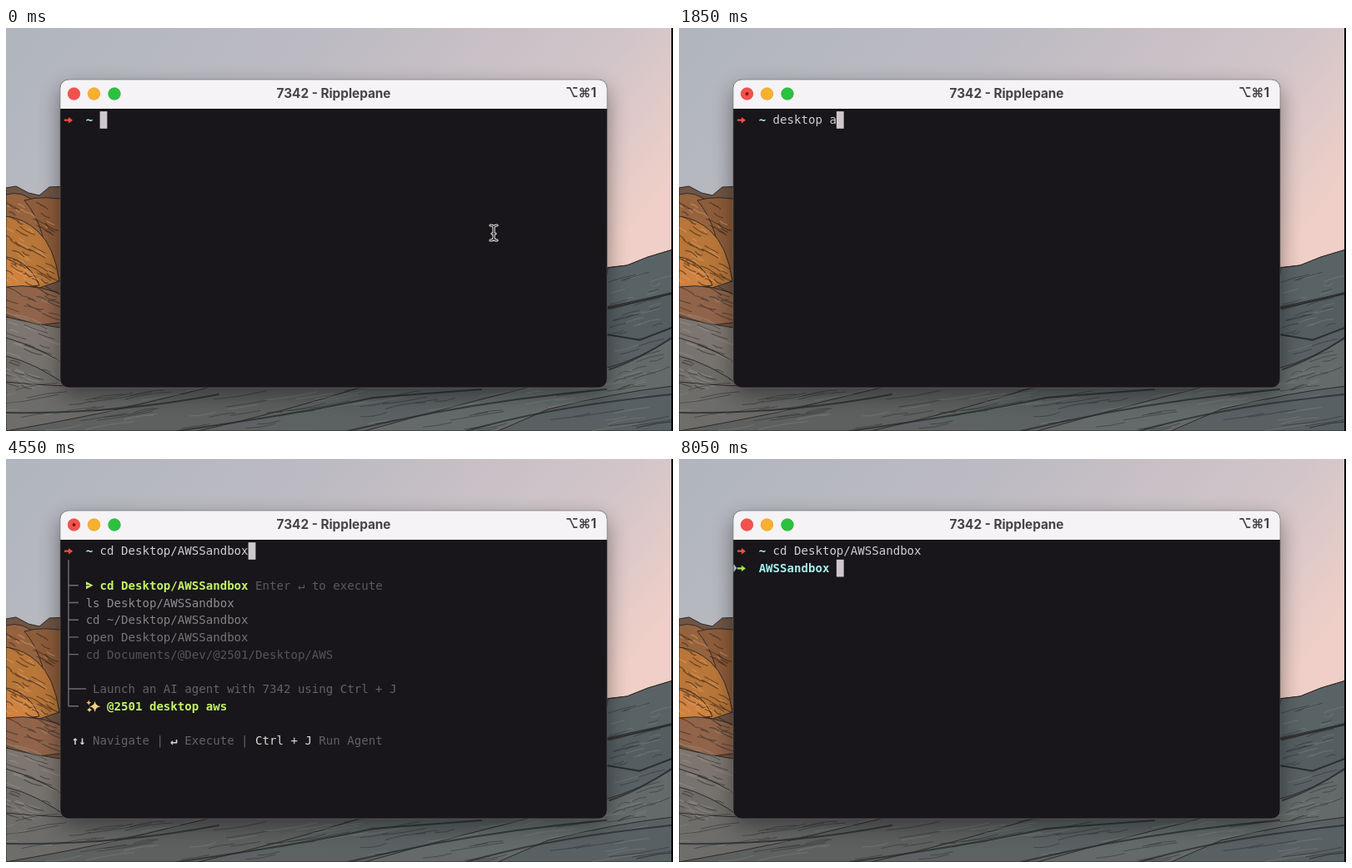
Write an HTML page that moves like this. It is 800x484 px and loops after 8.65 s.

```html
<!DOCTYPE html>
<html lang="en">
<head>
<meta charset="utf-8">
<title>Shell suggestions</title>
<style>
  html, body { margin: 0; width: 100%; height: 100%; overflow: hidden; background: #000; }
  svg { display: block; width: 100vw; height: 100vh; }
  text { white-space: pre; }
  .mono { font: 14.08px "DejaVu Sans Mono", monospace; }
  .ui { font: 700 15.3px Inter, "DejaVu Sans", sans-serif; fill: #464346; }
</style>
</head>
<body>
<svg viewBox="0 0 800 484" xmlns="http://www.w3.org/2000/svg">
  <defs>
    <linearGradient id="sky" gradientUnits="userSpaceOnUse" x1="0" y1="0" x2="560" y2="470">
      <stop offset="0" stop-color="#b0b5be"/>
      <stop offset=".42" stop-color="#bdbbc2"/>
      <stop offset=".8" stop-color="#d2c5c9"/>
      <stop offset="1.0" stop-color="#efcfc7"/>
    </linearGradient>
    <linearGradient id="stone" x1="0" y1="0" x2="1" y2="0">
      <stop offset="0" stop-color="#706e6b"/>
      <stop offset=".3" stop-color="#5e6262"/>
      <stop offset="1" stop-color="#576063"/>
    </linearGradient>
    <filter id="soft" x="-20%" y="-20%" width="140%" height="150%"><feGaussianBlur stdDeviation="13"/></filter>
    <clipPath id="frame"><rect x="65" y="62" width="656" height="370" rx="10"/></clipPath>
  </defs>

  <rect width="800" height="484" fill="url(#sky)"/>
  <g id="rocks" stroke="#2e2a27" stroke-linejoin="round"></g>
  <g id="cracks" fill="none" stroke-linecap="round"></g>
  <rect x="65" y="72" width="656" height="368" rx="12" fill="#000" opacity=".42" filter="url(#soft)"/>
  <rect x="798" width="2" height="484" fill="#000"/>

  <g clip-path="url(#frame)">
    <rect x="65" y="62" width="656" height="370" fill="#18161a"/>
    <rect x="65" y="62" width="656" height="35" fill="#f5f3f5"/>
    <rect x="65" y="97" width="656" height="1" fill="#0a0a0a"/>
  </g>
  <rect x="65" y="62" width="656" height="370" rx="10" fill="none" stroke="#6a686a" stroke-width=".6"/>
  <circle cx="81.5" cy="79" r="7.3" fill="#f4514d" stroke="#dc403d" stroke-width=".6"/>
  <circle cx="105.5" cy="79" r="7.3" fill="#f8b02f" stroke="#dc9a24" stroke-width=".6"/>
  <circle cx="130" cy="79" r="7.3" fill="#2bc240" stroke="#20a632" stroke-width=".6"/>
  <circle id="busy" cx="81.5" cy="79" r="2" fill="#7d1714"/>
  <text class="ui" x="393" y="84" text-anchor="middle">7342 - Ripplepane</text>
  <text class="ui" x="708" y="82.5" text-anchor="end">⌥⌘1</text>
  <g id="screen" class="mono"></g>
  <g id="pointer" fill="none" stroke-linecap="round">
    <path d="M581 237q4 0 4 3q0-3 4-3M585 240v12M583 247h4M581 255q4 0 4-3q0 3 4 3" stroke="#e8e8e8" stroke-width="3.2"/>
    <path d="M581 237q4 0 4 3q0-3 4-3M585 240v12M583 247h4M581 255q4 0 4-3q0 3 4 3" stroke="#161616" stroke-width="1.2"/>
  </g>
</svg>
<script>
const LOOP = 8650, CELL = 8.477, ROW = 20.7, LEFT = 70.2, TOP = 110.4;
const LIME = '#c4f466', CYAN = '#a2f1ed', PLAIN = '#cfcecf', FAINT = '#626263';
const $ = id => document.getElementById(id);
const colX = c => LEFT + c * CELL;
const rowY = r => TOP + r * ROW;

// Landscape
const rock = (fill, d) => `<path d="${d}" fill="${fill}"/>`;
$('rocks').innerHTML =
  rock('#6f5545', 'M0 192L12 190 27 198 40 201 52 191 80 190V484H0Z') +
  rock('#96633f', 'M0 200Q20 194 38 212 52 226 56 250L0 246Z') +
  rock('#8d5c3a', 'M22 207Q45 200 80 208V300H50Q50 240 22 207Z') +
  rock('#b97639', 'M0 226Q22 229 38 244 58 262 64 304L40 312 0 300Z') +
  rock('#cf8240', 'M0 275Q27 279 40 309L0 314Z') +
  rock('#91644a', 'M0 311Q40 305 80 326V352L30 358 0 346Z') +
  rock('#7d7670', 'M0 347Q35 356 80 362V420L0 380Z') +
  rock('#77736f', 'M0 372Q42 384 80 410V484H0Z') +
  rock('#6e6c69', 'M0 394Q36 402 80 434V484H0Z') +
  rock('url(#stone)', 'M0 425Q60 431 100 430H690L718 288 745 285 770 275 800 266V484H0Z') +
  rock('#596366', 'M722 288L745 285 770 275 800 266V318L715 336Z') +
  rock('#545e61', 'M715 337L758 329 800 319V360L760 374 715 368Z') +
  rock('#646a6a', 'M715 410Q760 398 800 372V430Q730 438 650 458L590 484H430Q560 447 715 410Z') +
  rock('#5e605f', 'M0 484Q110 465 180 447L250 430H430Q330 462 230 484Z');

function seeded(seed) {
  return () => (seed = (seed * 16807) % 2147483647) / 2147483647;
}
function crackSet(count, x, y, w, h, slope, len, seed) {
  const rnd = seeded(seed);
  let d = '';
  for (let i = 0; i < count; i++) {
    const l = len * (.4 + rnd());
    const bend = (rnd() - .5) * 8;
    d += `M${x + rnd() * w} ${y + rnd() * h}q${l / 2} ${slope * l / 2 + bend} ${l} ${slope * l}`;
  }
  return d;
}
const cracks = (d, width, opacity, color = '#262a2b') =>
  `<path d="${d}" stroke="${color}" stroke-width="${width}" opacity="${opacity}"/>`;
$('cracks').innerHTML =
  cracks(crackSet(22, -5, 208, 56, 95, .55, 13, 29), 1.3, .5, '#e0a164') +
  cracks(crackSet(46, -5, 205, 58, 108, .55, 14, 41), 1.2, .6, '#352318') +
  cracks(crackSet(24, -12, 318, 66, 112, .35, 22, 53), 1.3, .4, '#a39b93') +
  cracks(crackSet(32, -12, 318, 66, 116, .35, 24, 17), 1.1, .55) +
  cracks(crackSet(34, -30, 434, 790, 50, -.16, 44, 11), 1.3, .3, '#8b9190') +
  cracks(crackSet(52, -30, 434, 790, 50, -.16, 54, 73), 1, .5) +
  cracks(crackSet(20, 716, 294, 65, 150, -.28, 22, 31), 1.3, .3, '#899294') +
  cracks(crackSet(30, 716, 294, 65, 150, -.28, 24, 97), 1, .5) +
  cracks('M0 462Q130 464 255 440M205 484Q365 461 440 444L570 434M410 484Q560 448 720 434M552 484Q650 455 798 440M722 337L798 319M722 368L760 375 798 360M724 410Q760 398 798 372', 2, .75);

// Terminal parts
const put = (row, col, str, fill, bold) =>
  `<text x="${colX(col)}" y="${rowY(row) + 5}" fill="${fill}"${bold ? ' font-weight="700"' : ''}>${str}</text>`;
const block = (row, col, fill = '#cdc8cc') =>
  `<rect x="${colX(col)}" y="${rowY(row) - 10.3}" width="8.8" height="20.7" fill="${fill}"/>`;
const arrow = (row, fill) =>
  `<path transform="translate(70 ${rowY(row) + .3})" d="M0-1.1H5V-3.7L10 0 5 3.7V1.1H0Z" fill="${fill}"/>`;
const star = (x, y, r, fill) =>
  `<path transform="translate(${x} ${y}) scale(${r})" d="M0-1Q.1-.1 1 0 .1.1 0 1-.1.1-1 0-.1-.1 0-1Z" fill="${fill}"/>`;
function sparkles(row, col) {
  const x = colX(col), y = rowY(row);
  return star(x + 11, y + .5, 6.8, '#f6cf7c') + star(x + 3.6, y - 4, 3.4, '#f0b95a') + star(x + 4.4, y + 4.6, 3, '#f5d898');
}
const prompt = cmd => arrow(0, '#f0513f') + put(0, 3, '~', CYAN, true) + put(0, 5, cmd, PLAIN);

const suggestions = ['cd Desktop/AWSSandbox', 'ls Desktop/AWSSandbox', 'cd ~/Desktop/AWSSandbox',
  'open Desktop/AWSSandbox', 'cd Documents/@Dev/@2501/Desktop/AWS'];
const shades = ['#6c6c6c', '#8e8e8e', '#828282', '#747474', '#555556'];

function menu(selected) {
  let d = `M75 ${rowY(1) - 10}V${rowY(9)}H87M75 ${rowY(8)}H96`, out = '';
  suggestions.forEach((s, i) => {
    const row = i + 2;
    d += `M75 ${rowY(row)}H87`;
    if (!selected || i) out += put(row, 3, s, shades[i]);
  });
  if (selected) {
    out += `<path d="M96 ${rowY(2) - 4.5}L104.5 ${rowY(2)} 96 ${rowY(2) + 4.5}Z" fill="${LIME}"/>` +
      `<path d="M95.5 ${rowY(2)}H100" stroke="#18161a"/>` +
      put(2, 5, suggestions[0], LIME, true) + put(2, 27, 'Enter ↵ to execute', '#5a5a5b');
  }
  return `<path d="${d}" fill="none" stroke="#6e6e6f" stroke-width="1.4"/>` + out +
    put(8, 4, 'Launch an AI agent with 7342 using Ctrl + J', FAINT) +
    sparkles(9, 3) + put(9, 6, '@2501 desktop aws', LIME, true) +
    put(11, 1, '↑↓', '#d8d8d8', true) + put(11, 4, 'Navigate |', FAINT) +
    put(11, 15, '↵', '#d8d8d8', true) + put(11, 17, 'Execute |', FAINT) +
    put(11, 27, 'Ctrl + J', '#d8d8d8') + put(11, 36, 'Run Agent', FAINT);
}

// Timeline
const query = 'desktop aws';
const keyTimes = [850, 900, 1000, 1050, 1200, 1350, 1450, 1600, 1800, 1950, 2050];
const FETCH = 2250, LIST = 3200, SELECT = 4300, RUN = 5800, DONE = 5950;

function screenAt(t) {
  if (t >= DONE) {
    return prompt(suggestions[0]) + `<path d="M65.5 ${rowY(1) - 5}L69.5 ${rowY(1)} 65.5 ${rowY(1) + 5}Z" fill="#a6b3c6"/>` +
      arrow(1, '#9be84f') + put(1, 3, 'AWSSandbox', CYAN, true) + block(1, 14);
  }
  if (t >= RUN) return prompt(suggestions[0]) + block(1, 0);
  if (t >= SELECT) return prompt(suggestions[0]) + menu(true) + block(0, 26);
  const typed = keyTimes.filter(k => k <= t).length;
  let out = prompt(query.slice(0, typed));
  if (t >= LIST) out += menu(false);
  else if (t >= FETCH) out += sparkles(1, 1) + put(1, 4, 'Fetching suggestions...', '#565657');
  const redrawing = t >= 3700 && t < 3900;
  return out + (redrawing ? block(5, 0, '#f4f2f4') : block(0, 5 + typed));
}

let shown = '';
function draw(t) {
  const next = screenAt(t);
  if (next !== shown) $('screen').innerHTML = shown = next;
  const busy = (t >= 850 && t < 4600) || (t >= 6650 && t < 7400);
  $('busy').style.display = busy ? '' : 'none';
  $('pointer').style.display = t < 600 ? '' : 'none';
}

const start = performance.now();
function tick() {
  draw((performance.now() - start) % LOOP);
  requestAnimationFrame(tick);
}
draw(0);
requestAnimationFrame(tick);
</script>
</body>
</html>
```
